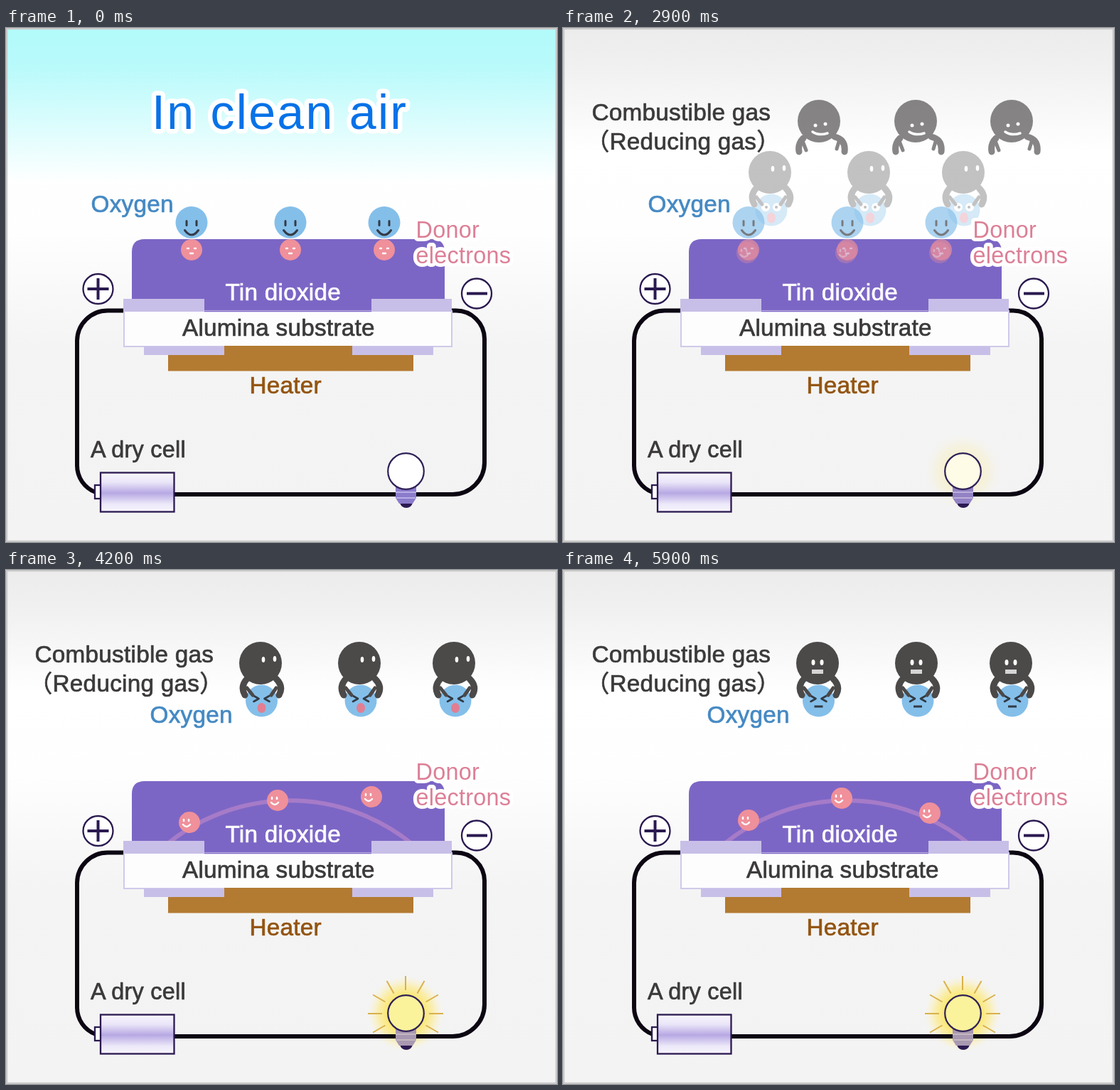
An HTML page that plays this animation: 775 px wide and 723 px high, repeating every 7.9 s.

```html
<!DOCTYPE html>
<html lang="en">
<head>
<meta charset="utf-8">
<title>Gas sensor principle</title>
<style>
html, body { margin: 0; width: 100%; height: 100%; overflow: hidden; background: #fff; }
svg { display: block; width: 775px; height: 723px; }
text { font: 33.3px "Liberation Sans", "Noto Sans CJK JP", Arial, sans-serif; letter-spacing: .25px; fill: currentColor; stroke: currentColor; stroke-width: .7; white-space: pre; }
.halo { stroke: #fff; stroke-width: 10; stroke-linejoin: round; paint-order: stroke; }
.title { font-size: 68px; letter-spacing: 2.3px; stroke-width: 13; }
.small { font-size: 32.4px; }
.ink { color: #3b3939; }
.blue { color: #4489c3; }
.pink { color: #dc7f96; }
.line { fill: none; stroke-linecap: round; stroke-linejoin: round; }
</style>
</head>
<body>
<svg viewBox="0 0 775 723">
  <defs>
    <linearGradient id="gray" x2="0" y2="1">
      <stop offset="0" stop-color="#ececec"/><stop offset=".07" stop-color="#f0f0f0"/>
      <stop offset=".24" stop-color="#fff"/><stop offset=".4" stop-color="#fefefe"/>
      <stop offset=".62" stop-color="#f4f4f4"/><stop offset="1" stop-color="#f3f3f3"/>
    </linearGradient>
    <linearGradient id="cyan" x2="0" y2="1">
      <stop offset="0" stop-color="#b2fafb"/><stop offset=".25" stop-color="#b9fafb"/>
      <stop offset="1" stop-color="#fff"/>
    </linearGradient>
    <linearGradient id="cell" x2="0" y2="1">
      <stop offset="0" stop-color="#f8f6fd"/><stop offset=".25" stop-color="#eae5f8"/>
      <stop offset=".52" stop-color="#b7a8e3"/><stop offset=".8" stop-color="#ece8f9"/>
      <stop offset="1" stop-color="#f8f6fd"/>
    </linearGradient>
    <radialGradient id="glow">
      <stop offset=".5" stop-color="#fbe874"/><stop offset=".72" stop-color="#fbec9c" stop-opacity=".8"/>
      <stop offset="1" stop-color="#fdf4c8" stop-opacity="0"/>
    </radialGradient>

    <g id="head"><circle r="30" fill="#4c4949"/></g>
    <g id="gasFree">
      <use href="#head"/>
      <g class="line" stroke="#4c4949" stroke-width="9">
        <path d="M-22 24Q-30 32-28 43M22 22Q38 26 36 43"/>
        <path d="M-23 28L-18 41M28 29L25 39" stroke-width="5"/>
      </g>
      <g fill="#fff"><circle cx="-5" cy="6" r="2.5"/><circle cx="9" cy="4" r="2.5"/></g>
      <path class="line" d="M-9 15Q0 21 12 17" stroke="#fff" stroke-width="3.5"/>
    </g>
    <g id="gasHold">
      <use href="#head"/>
      <g class="line" stroke="#4c4949" stroke-width="9">
        <path d="M-19 22Q-29 33-22 45M22 22Q33 33 26 45"/>
        <path d="M-19 35L-11 45M22 35L15 45" stroke-width="5"/>
      </g>
    </g>
    <g id="grin" fill="#fff">
      <ellipse cx="4" cy="-5" rx="2.3" ry="4"/><ellipse cx="20" cy="-6" rx="2.3" ry="4"/>
      <path class="line" d="M-1 6Q12 9 23 3Q23 9 15 10Q5 11-1 6Z" fill="#fff"/>
    </g>
    <g id="blank" fill="#fff">
      <ellipse cx="-6" cy="-1" rx="2.5" ry="4"/><ellipse cx="6" cy="-1" rx="2.5" ry="4"/>
      <rect x="-8" y="9" width="16" height="6" fill="#d5d5d5"/>
    </g>

    <circle id="ball" r="22.5" fill="#84bfea"/>
    <g id="oxyCalm">
      <use href="#ball"/>
      <path class="line" d="M-7-2V4M7-2V4M-9.500 11Q0 24 9.500 11" stroke="#353a44" stroke-width="3"/>
    </g>
    <g id="oxyShock">
      <use href="#ball"/>
      <circle cx="-8" cy="-4" r="6" fill="#fff"/><circle cx="8" cy="-4" r="6" fill="#fff"/>
      <circle cx="-7" cy="-4" r="2" fill="#444"/><circle cx="7" cy="-4" r="2" fill="#444"/>
      <ellipse cy="11" rx="6" ry="7.500" fill="#e27e92"/>
    </g>
    <g id="squint">
      <use href="#ball"/>
      <path class="line" d="M-11-7L-4-3L-11 1M11-7L4-3L11 1" stroke="#333a44" stroke-width="2.600"/>
    </g>
    <g id="oxyCry"><use href="#squint"/><ellipse cy="10" rx="6" ry="7" fill="#e27e92"/></g>
    <g id="oxyFlat"><use href="#squint"/><path d="M-6 8H6" stroke="#333a44" stroke-width="3"/></g>

    <circle id="dot" r="15" fill="#ef909b"/>
    <g id="donorCalm">
      <use href="#dot"/>
      <path class="line" d="M-6-2H-4M4-2H6M-2 5H2" stroke="#fff" stroke-width="2.400"/>
    </g>
    <g id="donorHappy">
      <use href="#dot"/>
      <path class="line" d="M-8-4V-2M-1-4V-2M-9 3Q-4 9 1 3" stroke="#fff" stroke-width="2.500"/>
    </g>
  </defs>

  <rect width="775" height="723" fill="url(#gray)"/>
  <rect data-show="sky" width="775" height="218" fill="url(#cyan)"/>

  <!-- circuit -->
  <circle data-show="lit" cx="562" cy="624" r="53" fill="url(#glow)"/>
  <g class="line" stroke="#0c0512" stroke-width="6">
    <path d="M166 397.500H143A43 43 0 0 0 100 440V615A40 40 0 0 0 126 653"/>
    <path d="M627 397.500H633A40 40 0 0 1 673 437V611A45 45 0 0 1 628 656H236"/>
  </g>
  <g fill="#fff" stroke="#2b1a50" stroke-width="2.300">
    <circle cx="129.500" cy="367" r="21"/><circle cx="662" cy="373.500" r="21"/>
    <path d="M114.500 367H144.500M129.500 352V382M648 373.500H677" stroke-width="4"/>
    <rect x="125" y="643" width="9" height="19"/>
    <rect x="133" y="625.500" width="103.500" height="55" fill="url(#cell)"/>
  </g>

  <!-- bulb -->
  <g data-show="rays" id="rays" stroke="#d9b14c" stroke-width="2"></g>
  <path d="M554 668H572Q570 675 563 675Q556 675 554 668Z" fill="#2c1a52"/>
  <path id="base" d="M548 645H577V661L572 669H553L548 661Z" fill="#8b7bcb"/>
  <path d="M548 653H577M549 661H576" stroke="#b9aee4" stroke-width="2"/>
  <path data-show="lit" d="M548 645H577V661L572 669H553L548 661Z" fill="#d8c58a" fill-opacity=".4"/>
  <circle cx="562.500" cy="623.500" r="25.300" fill="#fff"/>
  <circle data-show="lit" cx="562.500" cy="623.500" r="25.300" fill="#fbf29c"/>
  <circle cx="562.500" cy="623.500" r="25.300" fill="none" stroke="#2f2058" stroke-width="2.200"/>

  <!-- sensor -->
  <path d="M177 398V315Q177 297 195 297H599Q617 297 617 315V398Z" fill="#7c66c5"/>
  <path data-show="arc" class="line" d="M227 385A274 274 0 0 1 571 385" stroke="#a67bc8" stroke-width="6"/>
  <g data-show="calm" data-row="donorCalm 312 261 400 532"></g>
  <g data-show="grab" data-row="donorHappy 316 259 398 530"></g>
  <g data-show="lift">
    <use href="#donorHappy" x="258" y="355"/><use href="#donorHappy" x="382" y="324"/><use href="#donorHappy" x="514" y="319"/>
  </g>
  <g data-show="flowA">
    <use href="#donorHappy" x="221" y="385"/><use href="#donorHappy" x="316" y="328"/>
    <use href="#donorHappy" x="457" y="323"/><use href="#donorHappy" x="563" y="383"/>
  </g>
  <g data-show="flowB">
    <use href="#donorHappy" x="261" y="352"/><use href="#donorHappy" x="392" y="321"/><use href="#donorHappy" x="516" y="342"/>
  </g>
  <rect x="166" y="398" width="461" height="50" fill="#fdfdfe" stroke="#cfcaea" stroke-width="2"/>
  <path d="M165 381H279V399H165ZM514 381H627V399H514ZM194 448H307V460H194ZM487 448H601V460H487Z" fill="#c8bfe8"/>
  <path d="M279 398.500H514" stroke="#7c66c5" stroke-width="1.500"/>
  <path d="M307 447H487V460H573V482.500H228V460H307Z" fill="#b37a31"/>
  <text x="308.500" y="383" style="color:#fff">Tin dioxide</text>
  <text data-show="early" class="ink" x="248" y="433">Alumina substrate</text>
  <text data-show="late" class="ink" x="258" y="433">Alumina substrate</text>
  <text x="342.500" y="514" style="color:#935410">Heater</text>
  <text class="ink small" x="119" y="604">A dry cell</text>

  <!-- molecules -->
  <g data-show="free" data-row="gasFree 131 360 496 631"></g>
  <g data-show="calm" data-row="oxyCalm 273.500 261 400 532"></g>
  <g data-show="grab">
    <g data-row="oxyShock 256 293 432 564"></g>
    <g data-row="gasHold 203 291 430 563"></g>
    <g data-row="grin 203 291 430 563"></g>
  </g>
  <g data-show="lift">
    <g data-row="oxyCry 184 359.500 499 632"></g>
    <g data-row="gasHold 131 358 497 630"></g>
    <g data-row="grin 131 358 497 630"></g>
  </g>
  <g data-show="tired">
    <g data-row="oxyFlat 184 359.500 499 632"></g>
    <g data-row="gasHold 131 358 497 630"></g>
    <g data-row="blank 131 358 497 630"></g>
  </g>

  <!-- labels -->
  <g data-show="gasName" class="ink">
    <text x="40.500" y="130">Combustible gas</text>
    <text x="32" y="171">（Reducing gas）</text>
  </g>
  <text data-show="oxyLow" class="blue" x="119.500" y="259">Oxygen</text>
  <text data-show="oxyHigh" class="blue" x="202.500" y="215">Oxygen</text>
  <g class="pink">
    <text class="halo small" x="576.500" y="295">Donor</text>
    <text class="halo small" x="576.500" y="331">electrons</text>
  </g>
  <text data-show="title" class="halo title" x="205" y="142" style="color:#0872e8">In clean air</text>
  <rect x="1" y="1" width="773" height="721" fill="none" stroke="#cacaca" stroke-width="2.500"/>
</svg>
<script>
const LOOP = 7900;
const SVG = "http://www.w3.org/2000/svg";

function add(parent, tag, attrs) {
  const el = document.createElementNS(SVG, tag);
  for (const key in attrs) el.setAttribute(key, attrs[key]);
  parent.append(el);
}

for (const row of document.querySelectorAll("[data-row]")) {
  const [name, y, ...xs] = row.dataset.row.split(" ");
  for (const x of xs) add(row, "use", { href: "#" + name, x, y });
}

const rays = document.getElementById("rays");
for (let deg = -30; deg <= 210; deg += 30) {
  add(rays, "path", { d: "M33 0H53", transform: `translate(562 624) rotate(${-deg})` });
}

// Stepped opacity: time in ms -> value held until the next time
const fadeIn = t => ({ [t]: 1 / 3, [t + 200]: 2 / 3, [t + 400]: 1 });
const fadeOut = t => ({ [t]: 2 / 3, [t + 200]: 1 / 3, [t + 400]: 0 });
const tracks = {
  sky: { 0: 1, 1500: .45, 1700: 0 },
  title: { 0: 1, 1500: .8, 1700: .4, 1900: 0 },
  gasName: fadeIn(1500),
  free: { ...fadeIn(1500), ...fadeOut(2900) },
  calm: { 0: 1, 1500: .78, 1900: 1, ...fadeOut(2900) },
  grab: { ...fadeIn(2900), ...fadeOut(3800) },
  lit: { 2900: .25, 3100: .6, 3300: 1 },
  rays: { 3100: .5, 3300: 1 },
  arc: fadeIn(3800),
  lift: { ...fadeIn(3800), 4700: 0 },
  tired: { 4700: 1 },
  flowA: { 4700: 1, 4900: .5, 5100: 0, 5300: .5, 5500: 1, 5700: .5, 5900: 0 },
  flowB: { 4900: .5, 5100: 1, 5300: .5, 5500: 0, 5700: .5, 5900: 1 },
  oxyLow: { 0: 1, 4200: 0 },
  oxyHigh: { 4200: 1 },
  early: { 0: 1, 5900: 0 },
  late: { 5900: 1 }
};

function valueAt(track, time) {
  let value = 0;
  for (const start in track) if (time >= +start) value = track[start];
  return value;
}

const parts = [...document.querySelectorAll("[data-show]")];
function draw() {
  const time = performance.now() % LOOP;
  for (const part of parts) part.style.opacity = valueAt(tracks[part.dataset.show], time);
  requestAnimationFrame(draw);
}
draw();
</script>
</body>
</html>
```
